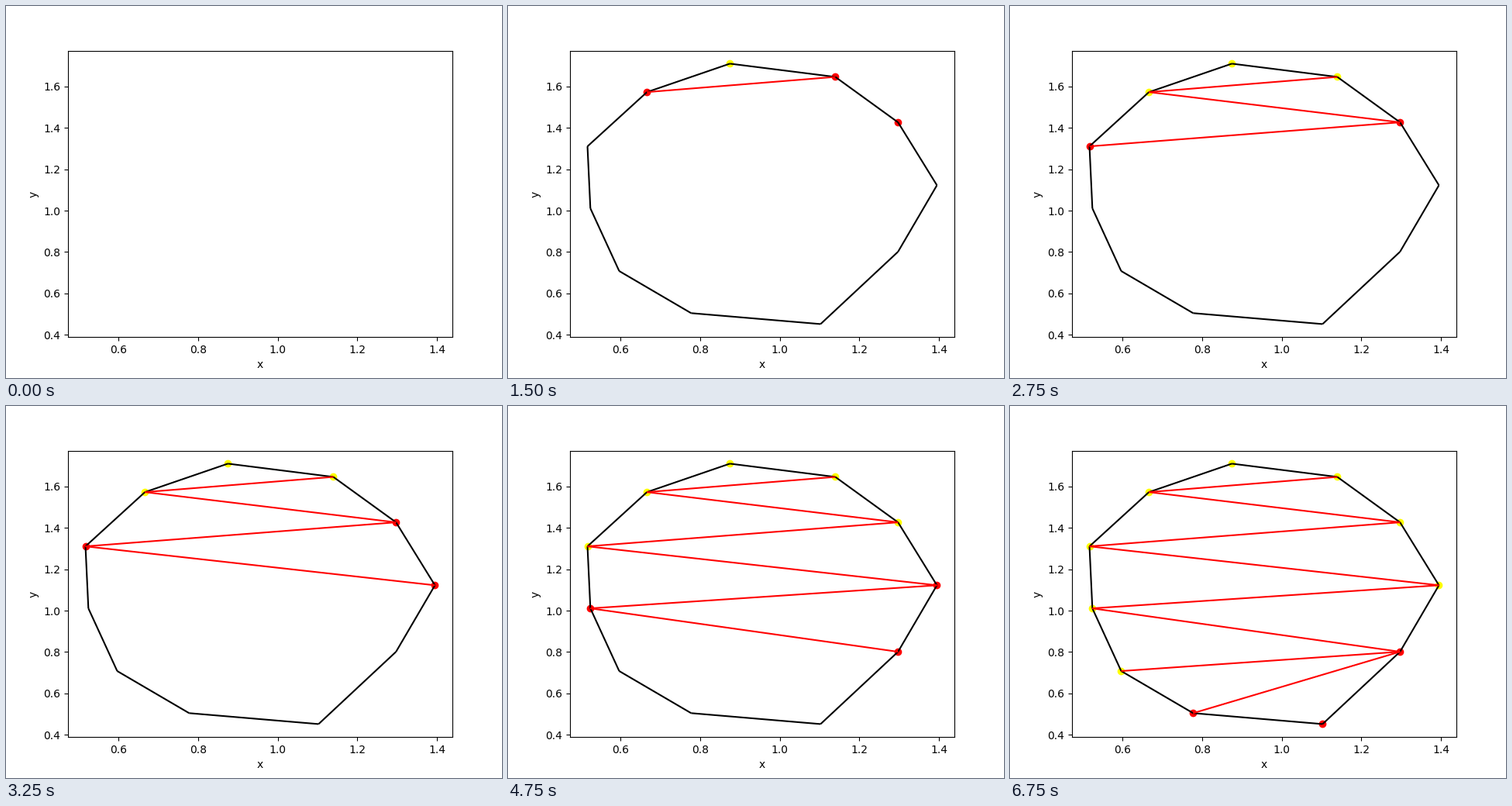
Write a matplotlib script that moves like this. It is 640 px wide and 480 px high and loops after 7 s.

```python
import matplotlib.pyplot as plt
import numpy as np
from matplotlib.animation import FuncAnimation
from matplotlib.collections import LineCollection

FRAMES, INTERVAL = 28, 250

# Vertices of the monotone polygon, sorted from top to bottom
PTS = np.array([
    (0.8745, 1.7088), (1.1393, 1.6449), (0.6662, 1.5716), (1.2969, 1.4258),
    (0.5168, 1.3099), (1.3946, 1.1222), (0.5241, 1.0108), (1.2969, 0.8015),
    (0.5965, 0.7084), (0.7772, 0.5054), (1.1023, 0.4527),
])
OUTLINE = [0, 2, 4, 6, 8, 9, 10, 7, 5, 3, 1]
EDGES = list(zip(OUTLINE, OUTLINE[1:] + OUTLINE[:1]))

# Sweep vertex k: the diagonal it gets and the vertex that is then finished
DIAGONALS = [(k - 1, k) for k in range(2, 9)] + [(7, 9)]
FINISHED = list(range(7)) + [8]


def segments(pairs):
    return [PTS[list(pair)] for pair in pairs]


def limits(values, margin=0.05):
    low, high = values.min(), values.max()
    pad = (high - low) * margin
    return low - pad, high + pad


fig, ax = plt.subplots(figsize=(6.4, 4.8), dpi=100)
ax.set(xlim=limits(PTS[:, 0]), ylim=limits(PTS[:, 1]), xlabel="x", ylabel="y")

stack_dots = ax.scatter([], [], color="red")
done_dots = ax.scatter([], [], color="yellow")
outline = ax.add_collection(LineCollection([], colors="black", linewidths=1.5))
diagonals = ax.add_collection(LineCollection([], colors="red", linewidths=1.5))


def draw(frame):
    # Each vertex takes three steps: push, connect, finish
    pushed = frame // 3 + 2 if frame >= 2 else 0
    connected = max(0, (frame - 1) // 3)
    finished = max(0, (frame - 2) // 3)

    done = FINISHED[:finished]
    stack = [i for i in range(pushed) if i not in done]
    stack_dots.set_offsets(PTS[stack] if stack else np.empty((0, 2)))
    done_dots.set_offsets(PTS[done] if done else np.empty((0, 2)))
    outline.set_segments(segments(EDGES) if frame else [])
    diagonals.set_segments(segments(DIAGONALS[:connected]))
    return stack_dots, done_dots, outline, diagonals


anim = FuncAnimation(fig, draw, frames=FRAMES, interval=INTERVAL,
                     repeat=True, repeat_delay=0)
plt.show()
```
